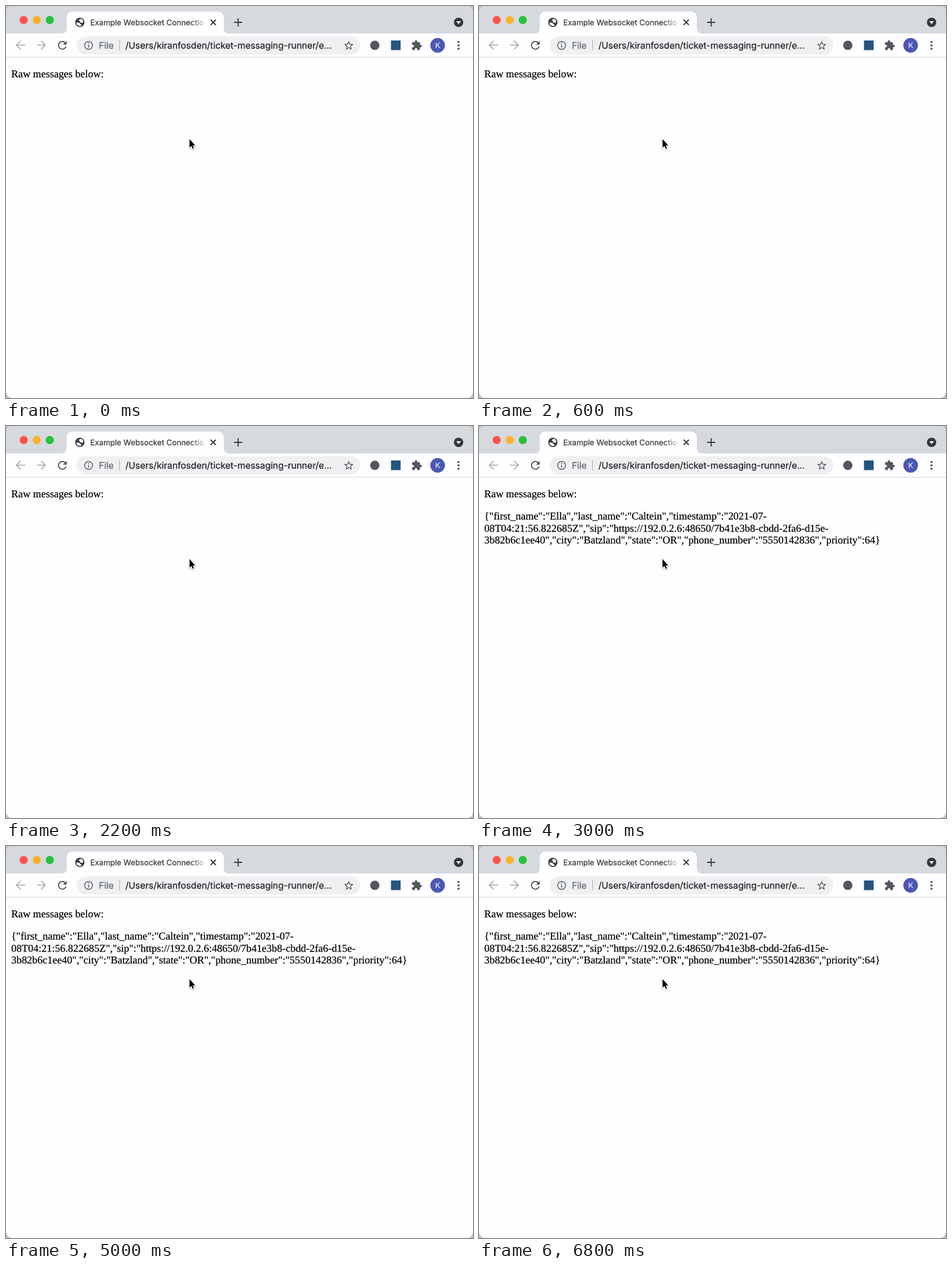
Recreate the animation shown at these times as an HTML page. Size 800 by 671 pixels, loop 8000 ms.

```html
<!DOCTYPE html>
<html lang="en">
<head>
<meta charset="utf-8">
<title>Raw messages</title>
<style>
  html, body { margin: 0; width: 100%; height: 100%; overflow: hidden; background: #c4c4c7; }
  svg { display: block; width: 100%; height: 100%; }
  text { font-family: Inter, Roboto, sans-serif; text-rendering: geometricPrecision; white-space: pre; }
  .page text { font: 17.94px "Liberation Serif", serif; font-kerning: none; fill: #000; stroke: #000; stroke-width: .25; }
  .bar { stroke-width: .25; }
  .line { fill: none; }
  .icon { fill: #54575b; }
</style>
</head>
<body>
<svg viewBox="0 0 800 671">
  <defs>
    <clipPath id="window"><rect width="800" height="671" rx="11"/></clipPath>
    <linearGradient id="fade" gradientUnits="userSpaceOnUse" x1="316" x2="344" y1="0" y2="0">
      <stop stop-color="#383b3f"/>
      <stop offset="1" stop-color="#383b3f" stop-opacity="0"/>
    </linearGradient>
    <filter id="shadow" x="-50%" y="-50%" width="200%" height="200%">
      <feDropShadow dx="0" dy="1.2" stdDeviation="1.1" flood-opacity=".35"/>
    </filter>
  </defs>

  <g clip-path="url(#window)">
    <rect width="800" height="671" fill="#fffdff"/>
    <rect width="800" height="47" fill="#d6dade"/>

    <!-- Tab strip -->
    <circle cx="30.3" cy="24" r="7" fill="#fe544d"/>
    <circle cx="52.7" cy="24" r="7" fill="#fcb32b"/>
    <circle cx="75" cy="24" r="7" fill="#27c13b"/>
    <path fill="#fffdff" d="M95 47q9 0 9-9V18.500a9 9 0 0 1 9-9h251a9 9 0 0 1 9 9V38q0 9 9 9z"/>
    <circle cx="126.500" cy="28" r="8" fill="#3c4043"/>
    <path fill="#fffdff" d="M120.500 28.500h3.500q3 .2 3 2.800h2v2.200q-1.200.800-3 .700-5-.600-5.500-5.700zM126.500 22.500l3-.500q2.700 1.800 3.100 5.200l-1.600 1.300h-2.500q-2-.300-2-2.500l-1.800-1.500z"/>
    <text class="bar" x="144.300" y="32.800" font-size="13.250" fill="url(#fade)" stroke="url(#fade)">Example Websocket Connectio</text>
    <path class="line" stroke="#36393d" stroke-width="1.900" d="M350.500 23.500l9 9m0-9l-9 9M390.700 28h14m-7-7v14"/>
    <circle cx="775.300" cy="28" r="8" fill="#34373b"/>
    <path fill="#fffdff" d="M771.300 26h8l-4 5z"/>

    <!-- Toolbar -->
    <path class="line" stroke="#a6a8ac" stroke-width="1.700" d="M18 67h15m-8-7.300L17.700 67l7.300 7.300M53 67h14m-7-7.300l7.300 7.300-7.300 7.300"/>
    <path class="icon" transform="translate(96.500 67.300) scale(.93) translate(-12 -12)" d="M17.650 6.350C16.200 4.900 14.210 4 12 4c-4.420 0-7.990 3.580-7.990 8s3.570 8 7.990 8c3.730 0 6.840-2.550 7.730-6h-2.080c-.820 2.330-3.040 4-5.650 4-3.310 0-6-2.690-6-6s2.690-6 6-6c1.660 0 3.140.690 4.220 1.780L13 11h7V4z"/>
    <rect x="121" y="52" width="486" height="31" rx="15.500" fill="#eef0f2"/>
    <circle class="line" cx="141.500" cy="67.500" r="6.800" stroke="#5a5d61" stroke-width="1.500"/>
    <path class="line" stroke="#5a5d61" stroke-width="1.600" d="M141.500 66.500v4.800m0-8v1.700"/>
    <text class="bar" x="159" y="73" font-size="15.400" fill="#65686c" stroke="#65686c">File</text>
    <path class="line" stroke="#b4b7bb" stroke-width="1.200" d="M194.500 58v18"/>
    <text class="bar" x="204.500" y="73" font-size="15.450" fill="#202225" stroke="#202225">/Users/kiranfosden/ticket-messaging-runner/e…</text>
    <path class="icon" transform="translate(587.200 67.200) scale(.82) translate(-12 -11.500)" d="M22 9.240l-7.190-.620L12 2 9.190 8.630 2 9.240l5.460 4.730L5.820 21 12 17.270 18.180 21l-1.630-7.030zM12 15.400l-3.760 2.270 1-4.280-3.320-2.880 4.380-.380L12 6.100l1.710 4.040 4.380.380-3.320 2.880 1 4.280z"/>
    <circle class="icon" cx="631.800" cy="67.300" r="8"/>
    <rect x="659.500" y="59" width="16.500" height="16.500" fill="#24557f"/>
    <path class="icon" transform="translate(704 67) scale(.8) translate(-12.500 -11.500)" d="M20.500 11H19V7c0-1.100-.900-2-2-2h-4V3.500a2.500 2.500 0 0 0-5 0V5H4c-1.100 0-1.990.900-1.990 2v3.800H3.500c1.490 0 2.700 1.210 2.700 2.700s-1.210 2.700-2.700 2.700H2V20c0 1.100.900 2 2 2h3.800v-1.500c0-1.490 1.210-2.700 2.700-2.700s2.700 1.210 2.700 2.700V22H17c1.100 0 2-.900 2-2v-4h1.500a2.500 2.500 0 0 0 0-5z"/>
    <circle cx="739.400" cy="67.300" r="12.500" fill="#4a58b5"/>
    <text x="739.500" y="72" font-size="13" text-anchor="middle" fill="#fff">K</text>
    <g class="icon">
      <circle cx="775.200" cy="61.500" r="1.850"/>
      <circle cx="775.200" cy="67.300" r="1.850"/>
      <circle cx="775.200" cy="73.100" r="1.850"/>
    </g>
    <rect y="87" width="800" height="1.200" fill="#d7d9dc"/>

    <g class="page">
      <text x="8.960" y="122.300">Raw messages below:</text>
      <g id="message">
        <text x="8.960" y="160.400">{"first_name":"Ella","last_name":"Caltein","timestamp":"2021-07-</text>
        <text x="8.960" y="180.600">08T04:21:56.822685Z","sip":"https://192.0.2.6:48650/7b41e3b8-cbdd-2fa6-d15e-</text>
        <text x="8.960" y="200.800">3b82b6c1ee40","city":"Batzland","state":"OR","phone_number":"5550142836","priority":64}</text>
      </g>
    </g>

    <path filter="url(#shadow)" stroke="#fff" stroke-width="2" paint-order="stroke" d="M314.400 227.800v14.700l3.200-3 2.300 5.100 2.100-.900-2.200-5h4.400z"/>
  </g>
</svg>
<script>
  const LOOP = 8000;
  const steps = [[0, 0], [3000, 1], [LOOP, 1]];

  document.getElementById("message").animate(
    steps.map(([time, opacity]) => ({ offset: time / LOOP, opacity, easing: "step-end" })),
    { duration: LOOP, iterations: Infinity }
  );
</script>
</body>
</html>
```
